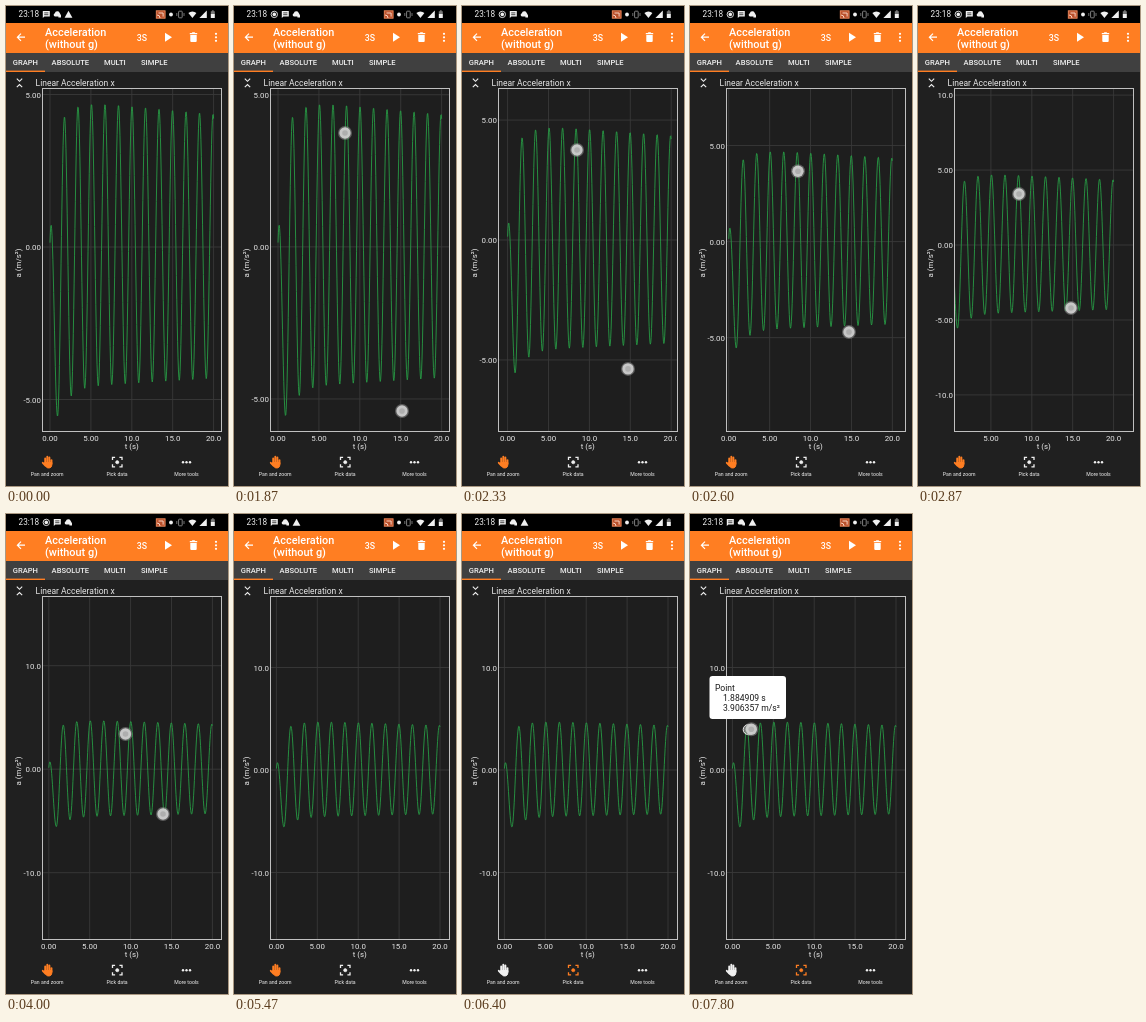
Animation, 222 px wide and 480 px high, one loop 8 s. Source, as an HTML page:

```html
<!DOCTYPE html>
<html lang="en">
<head>
<meta charset="utf-8">
<title>Pan and zoom</title>
<style>
html, body { margin: 0; width: 100%; height: 100%; overflow: hidden; background: #202020; }
svg { display: block; width: 222px; height: 480px; font-family: Roboto, sans-serif; }
.w { fill: #f0f0f0; }
.l { fill: none; stroke: #f0f0f0; }
.ax { font-size: 7.9px; fill: #e8e8e8; }
.tab { font-size: 7.6px; font-weight: 500; fill: #f0f0f0; }
.btn { font-size: 5.15px; fill: #f0f0f0; text-anchor: middle; }
.head { font-size: 10.9px; font-weight: 500; fill: #fff; }
</style>
</head>
<body>
<svg viewBox="0 0 222 480">
  <defs>
    <clipPath id="plot"><rect x="37" y="83" width="178" height="342"/></clipPath>
    <clipPath id="below"><rect x="30" y="426" width="185" height="14"/></clipPath>
    <g id="dot">
      <circle r="7" fill="#8c8c8c" fill-opacity=".55"/>
      <circle r="5.7" fill="#d0d0d0" fill-opacity=".92"/>
      <circle r="2.8" fill="#a8a8a8" fill-opacity=".8"/>
    </g>
  </defs>
  <rect width="222" height="480" fill="#202020"/>

  <!-- status bar -->
  <rect width="222" height="17" fill="#000"/>
  <text class="w" x="12.6" y="11.4" font-size="8.2">23:18</text>
  <g id="rec"><circle class="l" cx="40.3" cy="8.4" r="3.2" stroke-width=".9"/><circle class="w" cx="40.3" cy="8.4" r="1.8"/></g>
  <g id="notes">
    <path class="w" d="M47.8 5h7v5.4h-5.4l-1.6 1.6z"/>
    <path d="M49.2 6.9h4.2M49.2 8.7h4.2" stroke="#000" stroke-width=".7"/>
    <path class="w" d="M60 10.6a1.8 1.8 0 0 1 -.2-3.4a2.6 2.6 0 0 1 4.8-.5l1.4 2.6v2.2h-2.6v-.9z"/>
  </g>
  <path id="warn" class="w" d="M62.5 4.8l3.9 7h-7.8z"/>
  <rect x="150.3" y="4.8" width="8.8" height="7.4" fill="#b9502c" stroke="#f08a5c" stroke-width=".9"/>
  <path d="M151 9a3 3 0 0 1 3 3M152.5 7h4.6v3.6" fill="none" stroke="#ffe0d0" stroke-width=".9"/>
  <circle class="w" cx="165" cy="8.5" r="1.9"/>
  <g fill="none" stroke="#8c8c8c">
    <rect x="172.6" y="5.2" width="3.6" height="6.6" rx=".6" stroke-width=".9"/>
    <path d="M170.8 7v3M178 7v3" stroke-width=".8"/>
  </g>
  <path class="w" d="M182.4 7a6 6 0 0 1 8 0l-4 5z"/>
  <path class="w" d="M200.8 4.5v7.5h-7.4z"/>
  <path d="M204.8 5.2h1.1v-1h1.8v1h1.1v3h-4z" fill="#777"/>
  <path class="w" d="M204.8 8h4v4h-4z"/>

  <!-- header -->
  <rect y="17" width="222" height="30" fill="#ff7e22"/>
  <path d="M19 31.2h-7.4M15 27.6l-3.6 3.6l3.6 3.6" fill="none" stroke="#fff" stroke-width="1.2"/>
  <text class="head" x="39" y="29.6">Acceleration</text>
  <text class="head" x="39" y="42.2">(without g)</text>
  <text class="head" x="130.7" y="34.5" style="font-size:8.8px">3S</text>
  <path d="M159 26.8v9l7-4.5z" fill="#fff"/>
  <path d="M183.8 27h2l.6-.8h2.2l.6.8h2v1.2h-7.4zM184.3 28.9h6.4v6.2q0 1-1 1h-4.4q-1 0-1-1z" fill="#fff"/>
  <g fill="#fff"><circle cx="210" cy="27.8" r="1.1"/><circle cx="210" cy="31.3" r="1.1"/><circle cx="210" cy="34.8" r="1.1"/></g>

  <!-- tabs -->
  <rect y="47" width="222" height="19" fill="#404040"/>
  <rect y="64.6" width="39" height="1.4" fill="#ff7e22"/>
  <text class="tab" x="6.8" y="59.4">GRAPH</text>
  <text class="tab" x="45.6" y="59.4">ABSOLUTE</text>
  <text class="tab" x="98" y="59.4">MULTI</text>
  <text class="tab" x="135" y="59.4">SIMPLE</text>

  <!-- graph -->
  <path class="l" d="M10.8 72.6l2.7 2.7l2.7-2.7M10.8 81.2l2.7-2.7l2.7 2.7" stroke-width="1.1"/>
  <text class="ax" x="29.6" y="79.8" style="font-size:8.5px">Linear Acceleration x</text>
  <rect x="36.5" y="82.5" width="179" height="343" fill="#1e1e1e"/>
  <g clip-path="url(#plot)">
    <path id="grid" fill="none" stroke="#393939" stroke-width=".9"/>
    <path id="curve" fill="none" stroke="#279a44" stroke-width=".9" stroke-linejoin="round"/>
  </g>
  <rect x="36.5" y="82.5" width="179" height="343" fill="none" stroke="#c0c0c0"/>
  <g id="yLabels" class="ax" text-anchor="end"></g>
  <g clip-path="url(#below)"><g id="xLabels" class="ax" text-anchor="middle"></g></g>
  <text class="ax" text-anchor="middle" transform="translate(14.6 257) rotate(-90)">a (m/s²)</text>
  <text class="ax" x="125.7" y="442.8" text-anchor="middle">t (s)</text>

  <!-- tools -->
  <rect id="ripple" x="73" y="445" width="76" height="31" rx="8" fill="#fff"/>
  <g id="hand" stroke-linecap="round" stroke-linejoin="round">
    <path d="M39.2 457v-4.6M41.3 456v-5.2M43.4 456v-4.6M45.5 457.5v-3.4M36.8 456.8l2.6 2.8" fill="none" stroke-width="1.9"/>
    <path d="M39 456.5h6.9v2.4q-.4 2.8-2.4 3h-1.8q-1.6-.4-2.7-2.6z" stroke-width="1"/>
  </g>
  <g id="pick">
    <path d="M106.5 454v-2.6h2.6M113.4 451.4h2.6v2.6M116 458.3v2.6h-2.6M109.1 460.9h-2.6v-2.6" fill="none" stroke-width="1.3"/>
    <circle cx="111.25" cy="456.2" r="1.6" stroke-width=".6"/>
  </g>
  <g class="w"><circle cx="177" cy="456.3" r="1.2"/><circle cx="180.5" cy="456.3" r="1.2"/><circle cx="184" cy="456.3" r="1.2"/></g>
  <text class="btn" x="41.2" y="470.2">Pan and zoom</text>
  <text class="btn" x="111" y="470.2">Pick data</text>
  <text class="btn" x="180.5" y="470.2">More tools</text>

  <!-- picked point -->
  <g id="popup">
    <rect x="19.5" y="162" width="76.5" height="43" rx="3" fill="#fff"/>
    <g font-size="8.6" fill="#181818">
      <text x="25" y="177">Point</text>
      <text x="33" y="187">1.884909 s</text>
      <text x="33" y="197">3.906357 m/s²</text>
    </g>
    <circle cx="58.2" cy="215.6" r="5" fill="#fff" fill-opacity=".35" stroke="#eee"/>
  </g>
  <use id="t1" href="#dot"/>
  <use id="t2" href="#dot"/>
</svg>
<script>
const LOOP = 8000, ORANGE = '#ff7e22', WHITE = '#f0f0f0';
const el = id => document.getElementById(id);
const clamp = v => Math.max(0, Math.min(1, v));
const ramp = (t, a, b) => clamp((t - a) / (b - a));
const show = (node, on) => node.setAttribute('visibility', on ? 'visible' : 'hidden');

// time, x of t = 0, y of a = 0, pixels per m/s²
const view = [
  [1830, 44, 241, 30.5], [2330, 45.6, 234, 24], [2870, 32, 239, 15],
  [3400, 43, 253, 10.9], [4000, 42.8, 255.2, 10.35], [4400, 42.4, 256, 10.25]
];
// time, first finger x y, second finger x y
const tap = [[1400, 102, 194, 170, 326], [1600, 103, 193, 171, 327]];
const pinch = [
  [1870, 111, 127, 168, 405], [2330, 115, 144, 166, 363], [2870, 101, 188, 153, 302],
  [3400, 120.5, 216, 156.5, 300], [4000, 119.5, 220, 157, 300],
  [4470, 119, 219, 158, 300], [4730, 118.5, 215, 163.5, 300]
];

// monotone cubic through keyed rows
function track(keys, t) {
  const last = keys.length - 1;
  if (t <= keys[0][0]) return keys[0].slice(1);
  if (t >= keys[last][0]) return keys[last].slice(1);
  let i = 0;
  while (t > keys[i + 1][0]) i++;
  const h = keys[i + 1][0] - keys[i][0], u = (t - keys[i][0]) / h;
  const slope = (k, c) => (keys[k + 1][c] - keys[k][c]) / (keys[k + 1][0] - keys[k][0]);
  const tangent = (k, c) => {
    if (k === 0 || k === last) return 0;
    const a = slope(k - 1, c), b = slope(k, c);
    return a * b <= 0 ? 0 : 2 * a * b / (a + b);
  };
  return keys[i].slice(1).map((p, n) => {
    const c = n + 1, q = keys[i + 1][c];
    return p + (q - p) * u * u * (3 - 2 * u)
      + h * (tangent(i, c) * u * (1 - u) ** 2 - tangent(i + 1, c) * u * u * (1 - u));
  });
}

// turning points of the damped swing, joined by half cosines
const turns = [[-0.2, -1], [0.13, 0.72], [0.92, -5.55]];
for (let k = 0; k < 24; k++) {
  const n = k / 2;
  turns.push([1.77 + k * 0.8255, k % 2
    ? -(4.6 - 0.027 * n + 0.6 * Math.exp(-n * 1.4))
    : 4.83 - 0.043 * n - 0.56 * Math.exp(-n * 1.1)]);
}
const samples = [];
for (let s = 0, i = 0; s <= 20.001; s += 0.05) {
  while (s > turns[i + 1][0]) i++;
  const [a, p] = turns[i], [b, q] = turns[i + 1];
  samples.push([s, p + (q - p) * (1 - Math.cos(Math.PI * (s - a) / (b - a))) / 2]);
}

const label = v => v.toFixed(Math.abs(v) >= 10 ? 1 : 2);

function drawGraph(t) {
  const [x0, y0, ky] = track(view, t), kx = 8.18;
  const step = ky < 13 ? 10 : 5;
  let grid = '', xs = '', ys = '';
  for (let v = 0; v <= 25; v += 5) {
    const x = x0 + v * kx;
    if (x < 37 || x > 215) continue;
    grid += `M${x} 83V425`;
    xs += `<text x="${x}" y="434.8">${label(v)}</text>`;
  }
  for (let v = -20; v <= 20; v += step) {
    const y = y0 - v * ky;
    if (y < 83 || y > 425) continue;
    grid += `M37 ${y}H215`;
    ys += `<text x="35" y="${y + 3.1}">${label(v)}</text>`;
  }
  el('grid').setAttribute('d', grid);
  el('xLabels').innerHTML = xs;
  el('yLabels').innerHTML = ys;
  el('curve').setAttribute('d', 'M' + samples.map(([s, a]) =>
    (x0 + s * kx).toFixed(2) + ' ' + (y0 - a * ky).toFixed(2)).join('L'));
}

function fingers(t) {
  if (t >= 1400 && t < 1600) return track(tap, t);
  if (t >= 1870 && t < 4730) return track(pinch, t);
  if (t >= 5930 && t < 6130) return [113, 458.5];
  if (t >= 7670) return [61.3, 215.3];
  return [];
}

function render(t) {
  drawGraph(t);

  const f = fingers(t);
  ['t1', 't2'].forEach((id, i) => {
    const on = f.length > 2 * i;
    show(el(id), on);
    if (on) el(id).setAttribute('transform', `translate(${f[2 * i]} ${f[2 * i + 1]})`);
  });

  // the recording icon slides in early and leaves later
  const swap = 1 - ramp(t, 70, 400) + ramp(t, 5040, 5270);
  el('rec').setAttribute('opacity', 1 - clamp(swap * 2));
  el('notes').setAttribute('transform', `translate(${-11 * swap} 0)`);
  el('warn').setAttribute('opacity', swap);

  const picking = t >= 6130;
  const paint = (id, color) => ['stroke', 'fill'].forEach(a => el(id).setAttribute(a, color));
  paint('hand', picking ? WHITE : ORANGE);
  paint('pick', picking ? ORANGE : WHITE);
  el('ripple').setAttribute('opacity', t < 6070 ? 0 : 0.16 * (1 - ramp(t, 6130, 6400)));
  show(el('popup'), t >= 7730);
}

function tick() {
  render(performance.now() % LOOP);
  requestAnimationFrame(tick);
}
tick();
</script>
</body>
</html>
```
